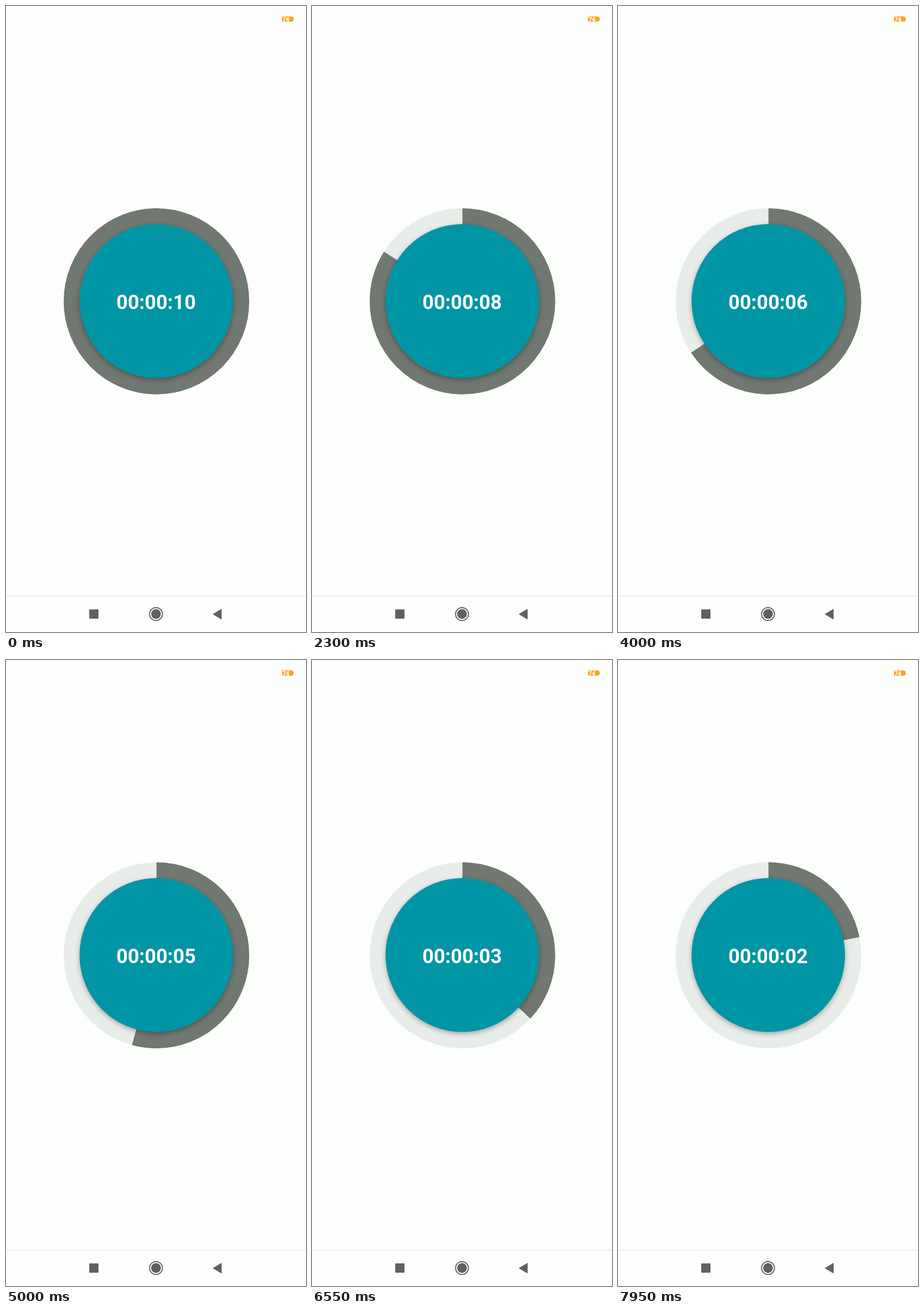
Recreate the animation shown at these times as an HTML page. Size 519x1080 px, loop 8 s.

```html
<!DOCTYPE html>
<html lang="en">
<head>
<meta charset="utf-8">
<title>Countdown</title>
<style>
  html, body { margin: 0; width: 100%; height: 100%; overflow: hidden; background: #fdfffc; }
  svg { display: block; width: 100%; height: 100%; }
  text { font-family: Roboto, sans-serif; font-weight: 700; fill: #fff; }
  #arc { fill: none; stroke: #717771; stroke-width: 30.5; }
  #disc { fill: #0095a5; filter: drop-shadow(0 3px 4px rgba(0, 0, 0, .3)); }
  #clock { font-size: 34.3px; text-anchor: middle; }
  #level { font-size: 11.5px; letter-spacing: -.9px; }
  #nav { fill: #5f615f; }
</style>
</head>
<body>
<svg viewBox="0 0 519 1080">
  <rect id="page" width="519" height="1080" fill="#fdfffc"/>

  <path d="M477.5 18H494.5Q497.8 18.5 497.8 22.5T494.5 27H477.5Z" fill="#f5a623"/>
  <text id="level" x="478" y="27">74</text>

  <circle cx="260.3" cy="509.5" r="160.5" fill="#e9edea"/>
  <circle id="arc" cx="260.3" cy="509.5" r="145.25" pathLength="1" transform="rotate(-90 260.3 509.5)"/>
  <circle id="disc" cx="260" cy="509" r="132.8"/>
  <text id="clock" x="259.7" y="523">00:00:10</text>

  <path d="M0 1018H519" stroke="#e7e8e8" stroke-width="1.6"/>
  <g id="nav">
    <rect x="144" y="1041" width="16" height="16" rx="1"/>
    <circle cx="259.5" cy="1049" r="11.2" fill="none" stroke="#5f615f" stroke-width="1.7"/>
    <circle cx="259.5" cy="1049" r="8.4"/>
    <path d="M357.5 1049.3L373 1040V1058.5Z"/>
  </g>
</svg>
<script>
  const LOOP = 8000, STEP = 50, SECONDS = 10, START = 842;
  // Time in ms and share of the ring already used up; linear in between.
  const PACE = [[0, 0], [START, 0], [2300, .1606], [4000, .3429], [5950, .5664], [7200, .7005], [LOOP, .7869]];

  const [page, arc, clock] = ['page', 'arc', 'clock'].map(id => document.getElementById(id));

  function elapsedShare(t) {
    const i = PACE.findIndex(([time]) => time > t);
    const [t0, s0] = PACE[i - 1], [t1, s1] = PACE[i];
    return s0 + (s1 - s0) * (t - t0) / (t1 - t0);
  }

  function draw(now) {
    const t = Math.floor(now % LOOP / STEP) * STEP;
    const left = 1 - elapsedShare(t);
    const seconds = Math.floor(left * SECONDS + .02);

    arc.setAttribute('stroke-dasharray', `${left} 2`);
    clock.textContent = '00:00:' + String(seconds).padStart(2, '0');
    page.setAttribute('fill', t < START ? '#fefdff' : '#fdfffc');
    requestAnimationFrame(draw);
  }

  requestAnimationFrame(draw);
</script>
</body>
</html>
```
